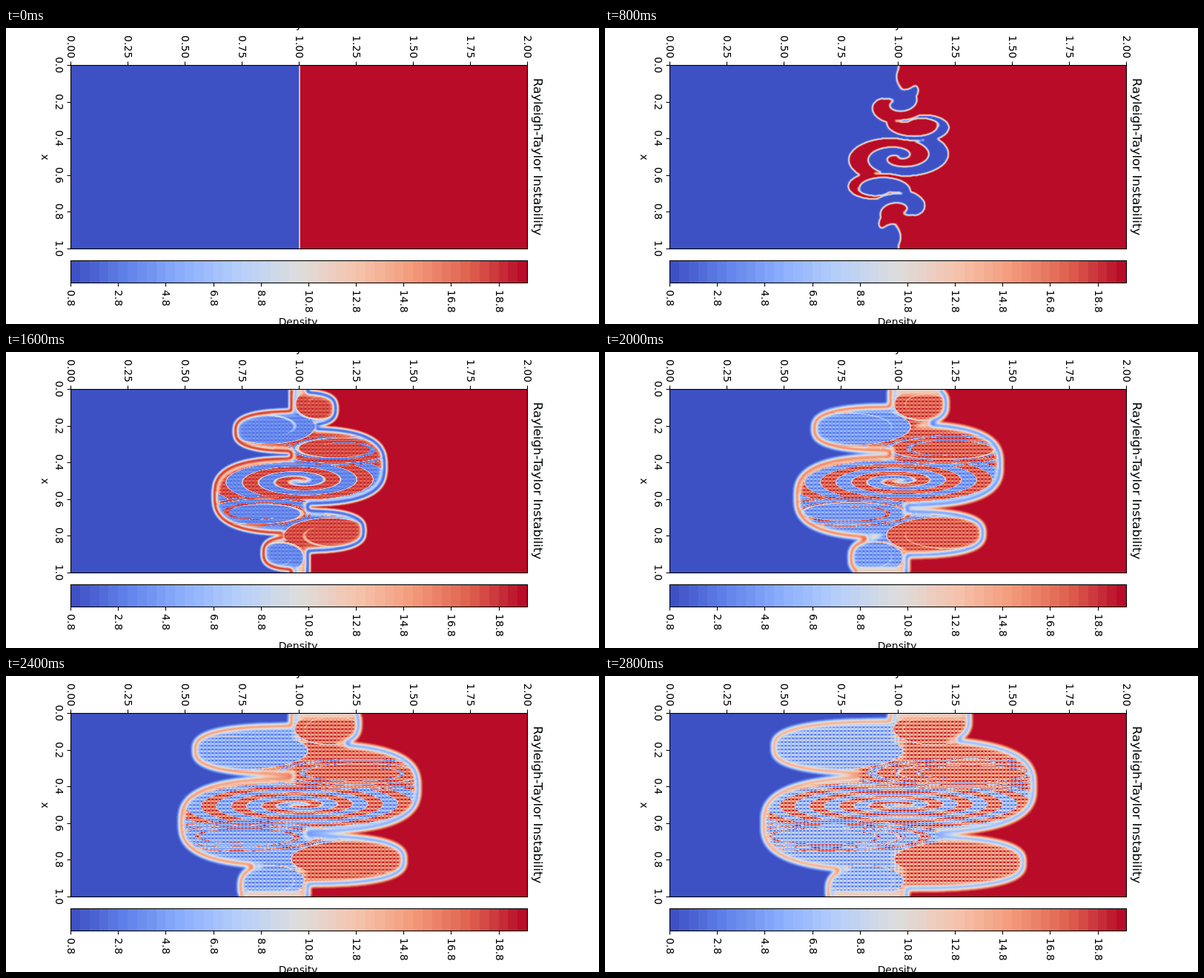
An HTML page with a canvas for the animation above (3000 ms loop, 800 px wide and 400 px high).

```html
<!DOCTYPE html>
<html lang="en">
<head>
<meta charset="utf-8">
<title>Density plot</title>
<style>
  html, body { margin: 0; width: 100%; height: 100%; overflow: hidden; background: #fff; }
  canvas { position: absolute; left: 87px; top: 50px; }
  svg { position: absolute; left: 0; top: 0; }
  text { font-family: "DejaVu Sans", sans-serif; }
</style>
</head>
<body>
<canvas id="view" width="616" height="248"></canvas>
<svg id="axes" width="800" height="400" viewBox="0 0 800 400"></svg>
<script>
const LEFT = 87, TOP = 50, WIDTH = 616, HEIGHT = 248;
const STEP = 200, LOOP = 3000, LEVELS = 48;
const MIXING_START = 1200, MIXING_END = 2800;
const MID_X = 309, MID_Y = 124.25; // plot centre, in plot coordinates

const mix = (a, b, s) => a + (b - a) * s;
const clamp = v => Math.max(0, Math.min(1, v));
const gray = v => `rgb(${[v, v, v].map(c => Math.round(c * 255))})`;
const flip = ([x, y]) => [2 * MID_X - x, 2 * MID_Y - y];

// Cool-warm palette in discrete contour bands
const stops = [[59, 76, 192], [97, 130, 234], [141, 176, 254], [184, 208, 249], [221, 221, 221],
  [245, 196, 173], [244, 154, 123], [222, 96, 77], [180, 4, 38]];
const palette = Array.from({ length: LEVELS }, (_, i) => {
  const p = (i + 0.5) / LEVELS * 8, k = Math.floor(p);
  return stops[k].map((c, j) => Math.round(mix(c, stops[k + 1][j], p - k)));
});

// Vortices from the centre outwards: each is born later and turns the other way.
// x drifts and width grows per second.
const vortices = [
  { x: 0, drift: 0, y: 0, width: 28, grow: 65, height: 38 },
  { x: 0, drift: 33, y: -43, width: 4, grow: 55, height: 22 },
  { x: 35, drift: -50, y: -72, width: 14, grow: 35, height: 26 },
  { x: 0, drift: 18, y: -102, width: 8, grow: 18, height: 22 },
];
const TURNS_PER_SECOND = 1.875, BIRTH_GAP = 0.22;

// Light fingers in the dense side: reach, centre and half height, from start to end of mixing
const fingers = [
  { reach: [36, 98], y: [33, 8], half: [20, 40] },
  { reach: [95, 185], y: [106, 99], half: [49, 66] },
  { reach: [62, 171], y: [188, 202], half: [27, 38] },
];

const newLayer = () => Object.assign(document.createElement("canvas"), { width: WIDTH, height: HEIGHT }).getContext("2d");
const view = document.getElementById("view").getContext("2d", { willReadFrequently: true });
const swirl = newLayer(), backdrop = newLayer();

function activeVortices(seconds) {
  return vortices.flatMap((v, j) => {
    const spin = Math.max(0, seconds - j * BIRTH_GAP) * TURNS_PER_SECOND * 2 * Math.PI * (-1) ** j;
    const center = [MID_X + v.x + v.drift * seconds, MID_Y + v.y];
    return (j ? [center, flip(center)] : [center]).map(([x, y]) =>
      ({ x, y, spin, width: v.width + v.grow * seconds, height: v.height }));
  }).reverse();
}

// Follow a point back through the vortices to its starting x
function startX(x, y, active) {
  for (const v of active) {
    const u = (x - v.x) / v.width, w = (y - v.y) / v.height, r2 = u * u + w * w;
    if (r2 >= 1) continue;
    const angle = v.spin * (1 - Math.sqrt(r2)), c = Math.cos(angle), s = Math.sin(angle);
    x = v.x + (u * c + w * s) * v.width;
    y = v.y + (w * c - u * s) * v.height;
  }
  return x;
}

function paintSwirl(t, softness, contrast, ripple) {
  const active = activeVortices(t / 1000);
  const image = swirl.createImageData(WIDTH, HEIGHT), data = image.data;
  const wave = 2 * Math.PI / 5;
  for (let y = 0, i = 0; y < HEIGHT; y++) {
    for (let x = 0; x < WIDTH; x++, i += 4) {
      const density = clamp(0.5 + (startX(x + 0.5, y + 0.5, active) - MID_X) / softness);
      const grid = ripple * Math.sin(y * wave) * (0.5 + 0.5 * Math.sin(x * wave));
      data[i] = data[i + 1] = data[i + 2] = 255 * (mix(0.6, density, contrast) + grid);
      data[i + 3] = 255;
    }
  }
  swirl.putImageData(image, 0, 0);
}

function soften(layer, radius) {
  view.drawImage(layer.canvas, 0, 0);
  view.filter = `blur(${radius}px)`;
  view.drawImage(layer.canvas, 0, 0);
  view.filter = "none";
}

function colorize() {
  const image = view.getImageData(0, 0, WIDTH, HEIGHT), data = image.data;
  for (let i = 0; i < data.length; i += 4) {
    const color = palette[Math.floor(data[i] * LEVELS / 256)];
    for (let j = 0; j < 3; j++) data[i + j] = color[j];
    data[i + 3] = 255;
  }
  view.putImageData(image, 0, 0);
}

// Edge of the mixing zone on the dense side, from top to bottom
function denseEdge(progress) {
  const rest = 14 * clamp(progress * 4);
  return Array.from({ length: HEIGHT * 2 + 1 }, (_, i) => {
    const reaches = fingers.map(({ reach, y, half }) => {
      const v = Math.abs(i / 2 - mix(...y, progress)) / mix(...half, progress);
      return mix(...reach, progress) * Math.max(0, 1 - v ** 2.8) ** (1 / 2.8);
    });
    return [MID_X + Math.max(rest, ...reaches), i / 2];
  });
}

function trace(points) {
  const path = new Path2D();
  for (const p of points) path.lineTo(...p);
  return path;
}

function paintBackdrop(right, left, zone, progress) {
  const ctx = backdrop;
  ctx.fillStyle = gray(0);
  ctx.fillRect(0, 0, WIDTH, HEIGHT);
  ctx.fillStyle = gray(1);
  ctx.fill(trace([...right, [WIDTH, HEIGHT], [WIDTH, 0]]));
  ctx.save();
  ctx.clip(zone);
  ctx.fillStyle = gray(0.58);
  ctx.fillRect(0, 0, WIDTH, HEIGHT);
  ctx.lineJoin = "round";
  const layers = [[22, 0.7], [12, mix(0, 0.22, progress)]];
  for (const [width, tone] of layers) {
    ctx.lineWidth = width;
    for (const [points, shade] of [[right, tone], [left, 1 - tone]]) {
      ctx.strokeStyle = gray(shade);
      ctx.stroke(trace(points));
    }
  }
  ctx.restore();
}

// Keep the swirl inside the zone, fading out before its rim
function trimSwirl(zone) {
  swirl.save();
  swirl.globalCompositeOperation = "destination-in";
  swirl.fill(zone);
  swirl.globalCompositeOperation = "destination-out";
  swirl.filter = "blur(2px)";
  swirl.lineWidth = 15;
  swirl.stroke(zone);
  swirl.restore();
}

function drawMixing(t) {
  const progress = (t - MIXING_START) / (MIXING_END - MIXING_START);
  const right = denseEdge(progress), left = right.map(flip);
  const zone = trace([...right, ...left]);
  zone.closePath();
  paintBackdrop(right, left, zone, progress);
  paintSwirl(t, 25, mix(0.85, 0.5, progress), 0.28 * progress);
  trimSwirl(zone);
  soften(backdrop, mix(1.6, 2.3, progress));
  view.filter = "blur(0.6px)";
  view.drawImage(swirl.canvas, 0, 0);
  view.filter = "none";
}

function drawRollUp(t) {
  paintSwirl(t, 3, 1, 0);
  soften(swirl, t ? 1.3 : 0.5);
}

function buildAxes() {
  const parts = [], line = 'stroke="#000" stroke-width="1.11"';
  const rect = (x, y, w, h, style) =>
    parts.push(`<rect x="${x}" y="${y}" width="${w}" height="${h}" ${style}/>`);
  const tick = (x, y, dx, dy) => parts.push(`<path d="M${x} ${y}l${dx} ${dy}" ${line}/>`);
  const text = (x, y, label, anchor, turn = 90, size = 13.89) => parts.push(
    `<text transform="translate(${x} ${y}) rotate(${turn})" text-anchor="${anchor}" font-size="${size}">${label}</text>`);

  palette.forEach((color, i) => rect(LEFT + i * WIDTH / LEVELS, 314.5, WIDTH / LEVELS, 30,
    `fill="rgb(${color})" shape-rendering="crispEdges"`));
  for (const [y, h] of [[50.5, 248], [314.5, 30]]) rect(87.5, y, WIDTH, h, `fill="none" ${line}`);

  for (let i = 0; i <= 8; i++) {
    const x = Math.round(LEFT + i * 77) + 0.5;
    tick(x, 50, 0, -4.5);
    text(x - 5, 41, (i / 4).toFixed(2), "end");
  }
  for (let i = 0; i <= 5; i++) {
    const y = Math.round(TOP + i * 49.6) + 0.5;
    tick(87, y, -4.5, 0);
    text(66.5, y - 0.5, (i / 5).toFixed(1), "middle");
  }
  for (let i = 0; i <= 9; i++) {
    const x = Math.round(LEFT + i * WIDTH * 5 / LEVELS) + 0.5;
    tick(x, 345, 0, 4.5);
    text(x - 5, 354, (0.8 + 2 * i).toFixed(1), "start");
  }
  text(48, 174.5, "x", "middle");
  text(395, 0, "y", "middle", 0);
  text(394, 402, "Density", "middle", 0);
  text(712, 174, "Rayleigh-Taylor Instability", "middle", 90, 16.67);
  document.getElementById("axes").innerHTML = parts.join("");
}

let shown = -1;
function play() {
  const t = Math.floor(performance.now() % LOOP / STEP) * STEP;
  if (t !== shown) {
    shown = t;
    if (t < MIXING_START) drawRollUp(t);
    else drawMixing(t);
    colorize();
  }
  requestAnimationFrame(play);
}

buildAxes();
play();
</script>
</body>
</html>
```
